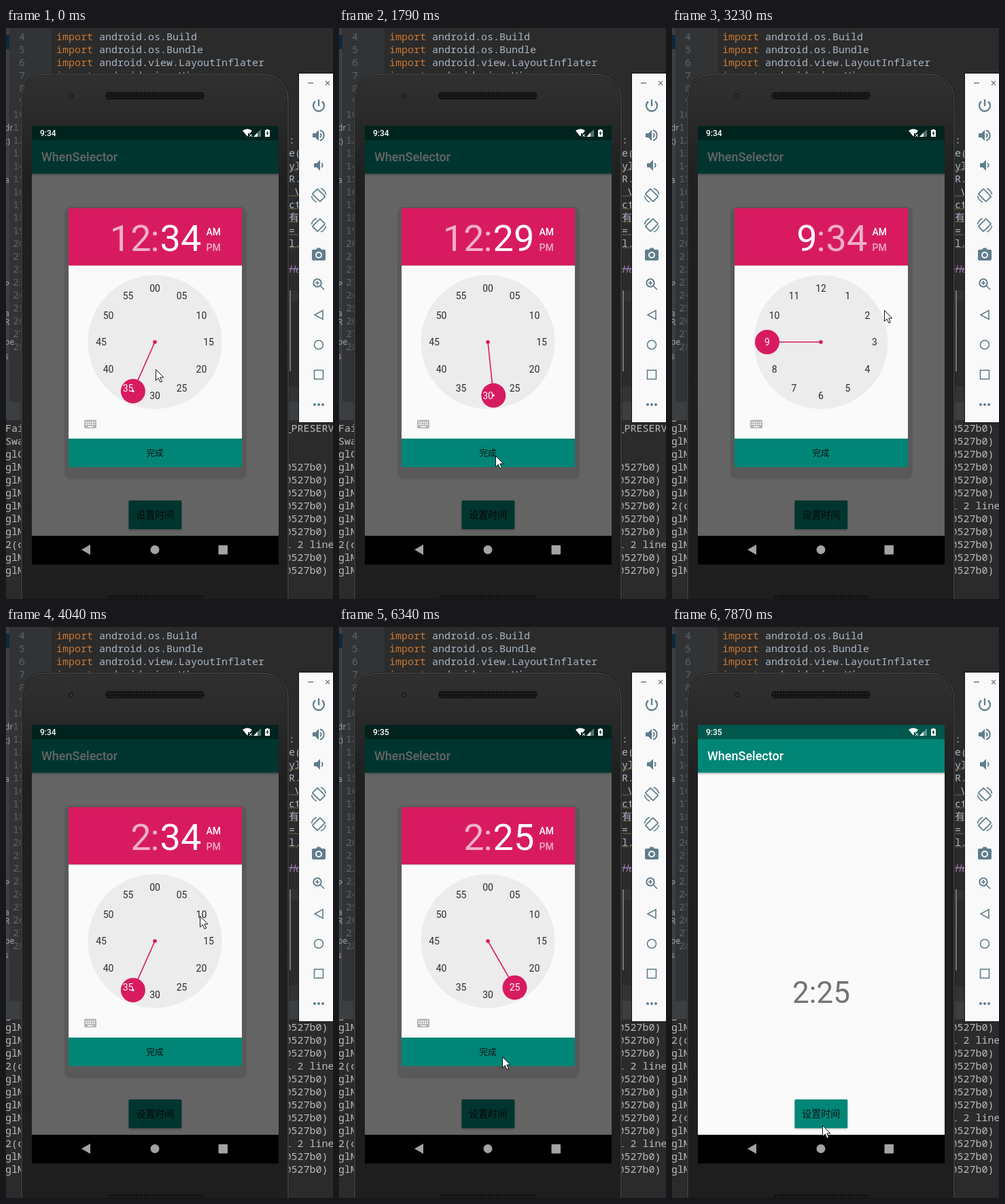
Recreate the animation shown at these times as an HTML page. Size 481 by 840 pixels, loop 7.99 s.

```html
<!DOCTYPE html>
<html lang="en">
<head>
<meta charset="utf-8">
<title>Time picker</title>
<style>
  html, body { margin: 0; width: 100%; height: 100%; overflow: hidden; background: #2b2b2b; }
  svg { display: block; width: 481px; height: 840px; }
  text { white-space: pre; }
  .mono { font: 15px "Noto Sans Mono", "DejaVu Sans Mono", monospace; fill: #a9b7c6; }
  .no { fill: #606366; text-anchor: end; }
  .key { fill: #cc7832; }
  .side { font: 12px "Noto Sans", sans-serif; fill: #a0a4a6; }
  .log { fill: #bbb; }
  .ui { font-family: Roboto, sans-serif; }
  .cjk { font-family: "Noto Sans CJK SC", "Noto Sans CJK", sans-serif; text-anchor: middle; fill: #111; }
  .med { font-weight: 500; fill: #fff; }
  .big { font-size: 54px; fill: #fff; }
  .num { font-size: 14px; text-anchor: middle; }
  .pink { fill: #d81b60; }
  .teal { fill: #008577; }
  .raised { filter: drop-shadow(0 1px 1px rgba(0, 0, 0, .3)); }
  .icon { fill: none; stroke: #5f7d8c; stroke-width: 2; }
  .icon .f { fill: #5f7d8c; stroke: none; }
</style>
</head>
<body>
<svg viewBox="0 0 481 840">
  <defs>
    <linearGradient id="shell" x2="0" y2="1">
      <stop offset="0" stop-color="#303030"/>
      <stop offset=".1" stop-color="#282828"/>
      <stop offset=".2" stop-color="#1f1f1f"/>
      <stop offset="1" stop-color="#1e1e1e"/>
    </linearGradient>
    <linearGradient id="fall" x2="0" y2="1">
      <stop offset="0" stop-opacity=".2"/>
      <stop offset="1" stop-opacity="0"/>
    </linearGradient>
    <pattern id="mesh" width="4" height="4" patternUnits="userSpaceOnUse">
      <rect width="4" height="4" fill="#111"/>
      <circle cx="2" cy="2" r="1" fill="#2c2c2c"/>
    </pattern>
    <clipPath id="logBox"><rect y="577" width="481" height="263"/></clipPath>
    <clipPath id="knobClip"><circle class="knobPos" r="18"/></clipPath>
  </defs>

  <!-- editor -->
  <rect width="481" height="840" fill="#2b2b2b"/>
  <rect width="67" height="550" fill="#313335"/>
  <rect width="5" height="550" fill="#3c3f41"/>
  <rect y="10" width="5" height="21" fill="#0d293e"/>
  <rect x="416" y="386" width="15" height="16" fill="#323232"/>
  <rect x="416" y="527" width="65" height="23" fill="#313335"/>
  <rect y="550" width="481" height="27" fill="#3c3f41"/>
  <g id="side"></g>
  <g id="code"></g>
  <rect x="417" y="386" width="2" height="119" fill="#777"/>
  <g clip-path="url(#logBox)"><g id="log"></g></g>

  <!-- phone -->
  <path d="M23 850V108Q23 68 63 68H375Q415 68 415 108V850" fill="url(#shell)" stroke="#111" stroke-width="2.600"/>
  <path d="M23 850V108Q23 68 63 68H375Q415 68 415 108V850" fill="none" stroke="#666"/>
  <rect x="146" y="94" width="146" height="11" rx="5.500" fill="url(#mesh)"/>
  <rect x="148" y="834" width="143" height="12" rx="5.500" fill="url(#mesh)"/>
  <circle cx="96" cy="100" r="3.500" fill="#1c1d1e"/>
  <circle cx="96" cy="100" r="1.200" fill="#45484a"/>

  <!-- app -->
  <g class="ui">
    <rect x="38" y="144" width="363" height="603" fill="#fafafa"/>
    <rect x="38" y="214.500" width="363" height="4" fill="url(#fall)"/>
    <rect x="38" y="144" width="363" height="21" fill="#00574b"/>
    <rect class="teal" x="38" y="165" width="363" height="49.500"/>
    <text class="med" x="52" y="196" font-size="18">WhenSelector</text>
    <text id="main" x="219.500" y="553" font-size="44" text-anchor="middle" fill="#737373"></text>
    <rect class="teal raised" x="180.500" y="695" width="77.700" height="42.300" rx="1.500"/>
    <text class="cjk" x="219.300" y="721" font-size="14">设置时间</text>
    <rect id="dim" x="38" y="144" width="363" height="603"/>

    <text id="status" class="med" x="50" y="159" font-size="12"></text>
    <g fill="#fff">
      <path d="M348 151Q355 146 362 151L359 155H356V158L355 159.500Z"/>
      <path d="M358 156l4 4m0-4l-4 4" stroke="#fff"/>
      <path d="M364 160L375 149V160Z" opacity=".35"/>
      <path d="M364 160L370 154V160Z"/>
      <path d="M381 150h2v-1h3v1h2v10h-7z"/>
      <path d="M385 151l-2.500 4.500h1.500v3l2.500-4.500h-1.500z" fill="#00352e"/>
    </g>
    <rect x="38" y="747" width="363" height="42.300"/>
    <g fill="#a3a3a3">
      <path d="M111 767.500L124 760V775Z"/>
      <circle cx="219" cy="767.500" r="6.500"/>
      <rect x="312.500" y="761" width="13.500" height="13.500" rx="1"/>
    </g>

    <g id="dialog">
      <rect x="86" y="263" width="268" height="401" rx="9" opacity=".11"/>
      <rect class="pink" x="92" y="265" width="255" height="84.500"/>
      <rect x="92" y="349.500" width="255" height="255" fill="#fafafa"/>
      <rect class="teal" x="92" y="604" width="255" height="42"/>
      <text class="cjk" x="219" y="630" font-size="12.500">完成</text>
      <text id="hour" class="big" x="213.500" y="328" text-anchor="end"></text>
      <text class="big" x="212.500" y="328" opacity=".65">:</text>
      <text id="minute" class="big" x="226.600" y="328"></text>
      <text class="med" x="294.500" y="305" font-size="14">AM</text>
      <text class="med" x="294.500" y="328" font-size="14" opacity=".65">PM</text>
      <circle cx="219" cy="462" r="98.500" fill="#ececec"/>
      <g id="dark" fill="#2b2b2b"></g>
      <circle class="pink" cx="219" cy="462" r="2.800"/>
      <line id="hand" x1="219" y1="462" stroke="#d81b60" stroke-width="1.600"/>
      <circle class="pink knobPos" r="18"/>
      <g clip-path="url(#knobClip)"><g id="light" fill="#fff"></g></g>
      <circle id="dot" class="knobPos" r="1.700" fill="#fff"/>
      <rect x="115" y="576.500" width="18" height="12.500" rx="1.800" fill="#b4b4b4"/>
      <path d="M117 580h14m-14 3h14" stroke="#fafafa" stroke-width="1.800" stroke-dasharray="1.800 1.250"/>
      <path d="M120 586.500h8" stroke="#fafafa" stroke-width="1.600"/>
    </g>
  </g>

  <!-- emulator toolbar -->
  <rect x="430" y="66" width="51" height="515" fill="#111"/>
  <rect x="431" y="67" width="50" height="513" fill="#f9f9f9"/>
  <path d="M444 81h8M470 78l6 6m0-6l-6 6" stroke="#777" stroke-width="1.300"/>
  <g class="icon">
    <g transform="translate(460 114)"><path d="M0-9V1M-5-6A8 8 0 1 0 5-6" stroke-width="2.300"/></g>
    <g transform="translate(460 158)">
      <path class="f" d="M-9-3h4l5-5v16l-5-5h-4z"/>
      <path d="M2-3A3.500 3.500 0 0 1 2 3M2-7.500A7.800 7.800 0 0 1 2 7.500"/>
    </g>
    <g transform="translate(460 202)">
      <path class="f" d="M-7-3h4l5-5v16l-5-5h-4z"/>
      <path d="M4-3A3.500 3.500 0 0 1 4 3"/>
    </g>
    <g id="turn" transform="translate(460 246)">
      <rect x="-5.300" y="-8" width="10.600" height="16" rx="1" transform="rotate(-45)" stroke-width="1.800"/>
      <path d="M3-10Q9.500-7.500 10.500-1M-3 10Q-9.500 7.500-10.500 1" stroke-width="1.600"/>
    </g>
    <use href="#turn" transform="translate(920 44) scale(-1 1)"/>
    <g transform="translate(460 333)">
      <path class="f" d="M-8-7h4l2-2.500h4l2 2.500h4q2 0 2 2v12q0 2-2 2h-16q-2 0-2-2v-12q0-2 2-2z"/>
      <circle r="4" cy="1" stroke="#f9f9f9"/>
    </g>
    <g transform="translate(460 377)">
      <circle cx="-2" cy="-2" r="5.700"/>
      <path d="M2.500 2.500L8 8M-5-2h6M-2-5v6" stroke-width="1.700"/>
    </g>
    <path d="M466 415.500V428.500L454 422Z" stroke-width="1.600"/>
    <circle cx="460" cy="466" r="6.500" stroke-width="1.600"/>
    <rect x="453.500" y="503.500" width="13" height="13" stroke-width="1.600"/>
    <path d="M454 554h12.100" stroke-width="4" stroke-linecap="round" stroke-dasharray="0 6"/>
  </g>

  <path id="cursor" d="M.5.5V16.500L4.200 13L7 19L9.500 18L6.800 12H11.800Z" fill="#fff" stroke="#111"/>
</svg>
<script>
const LOOP = 7990;
const CX = 219, CY = 462, R = 79;
const $ = id => document.getElementById(id);

function put(parent, cls, x, y, str) {
  const el = document.createElementNS("http://www.w3.org/2000/svg", "text");
  el.setAttribute("class", cls);
  el.setAttribute("x", x);
  el.setAttribute("y", y);
  el.textContent = str;
  parent.append(el);
  return el;
}

function set(el, attrs) {
  for (const k in attrs) el.setAttribute(k, attrs[k]);
}

// Editor text: 19 px lines, starting at line 4
const lineY = n => 17.5 + (n - 4) * 19;
for (let n = 4; n <= 28; n++) put($("code"), "mono no", 28, lineY(n), n);
["os.Build", "os.Bundle", "view.LayoutInflater", "view.View"].forEach((name, i) => {
  put($("code"), "mono key", 74, lineY(4 + i), "import");
  put($("code"), "mono", 137, lineY(4 + i), "android." + name);
});
[":", "e(", "yl", "R.", " V", "ct", "有", "=", "l."].forEach((s, i) =>
  put($("code"), "mono", 416, lineY(12 + i), s));
set(put($("code"), "mono", 416, lineY(22), "He"),
  { style: "fill:#9876aa;font-style:italic;text-decoration:line-through" });
const wave = document.createElementNS("http://www.w3.org/2000/svg", "path");
set(wave, {
  d: [210, 248, 267, 286, 305, 324].map(y => `M416 ${y}` + "l2-2l2 2".repeat(4)).join(""),
  fill: "none", stroke: "#85804f", "stroke-width": .8
});
$("code").append(wave);
[["dr", 151], ["t)", 171], ["a", 228], ["P", 382], ["a", 424], ["R", 437], ["pe", 466], ["s", 487]]
  .forEach(([s, y]) => put($("side"), "side", -2, y, s));

// Log lines as [left part, right part]
const make = ["eglM", "0527b0)"], same = ["82(c", "l 2 lines"];
const log = [[" Fai", "_PRESERVED"], [" Swa", ""], ["eglC", ""],
  ...Array(6).fill(make), same, ...Array(5).fill(make), same, ...Array(6).fill(make)];
const logRows = log.map(([a, b], i) => [
  put($("log"), "mono log", -10, 594 + i * 19, a),
  put($("log"), "mono log", 410.5, 594 + i * 19, b)
]);

// Dial labels, once dark and once white for inside the knob
const labels = ["dark", "light"].map(id => Array.from({ length: 12 }, (_, i) => {
  const a = i * Math.PI / 6;
  return put($(id), "num", CX + R * Math.sin(a), CY + 5 - R * Math.cos(a), "");
}));

// Pointer stops: time, x, y
const stops = [
  [0, 220, 502], [120, 206, 515], [270, 190, 531], [420, 181, 538], [570, 188, 544],
  [720, 200, 549], [870, 214, 552], [1030, 228, 549], [1180, 232, 562], [1330, 240, 582],
  [1480, 236, 602], [1640, 232, 622], [1790, 230, 629], [2210, 226, 675], [2330, 222, 712],
  [2450, 228, 690], [2570, 250, 612], [2690, 274, 533], [2840, 292, 480], [2990, 303, 445],
  [3110, 309, 425], [3230, 312, 415], [3380, 300, 419], [3530, 285, 425], [4560, 283, 450],
  [4690, 279, 490], [4820, 275, 522], [4950, 272, 535], [5480, 267, 565], [5630, 257, 610],
  [5780, 246, 655], [5910, 238, 679], [6060, 240, 632], [7450, 238, 655], [7590, 231, 692],
  [7730, 224, 722], [7870, 221, 733]
];

// Each event overrides part of the state from its time on
const events = [
  [0, { h: 12, m: 34, hours: false, dim: .6, alpha: 1, off: 0, main: "0:29", clock: "9:34" }],
  [420, { m: 35 }], [570, { m: 34 }], [720, { m: 32 }], [870, { m: 30 }], [1030, { m: 29 }],
  [1940, { dim: .32, alpha: .08 }],
  [2090, { dim: 0, alpha: 0, off: 2 }],
  [2840, { h: 9, m: 34, hours: true, dim: .3, alpha: .4, off: 3 }],
  [2990, { dim: .6, alpha: 1 }],
  [3680, { h: 2 }],
  [3800, { hours: false }],
  [3920, { off: 6 }],
  [4560, { clock: "9:35" }],
  [5230, { m: 25 }],
  [6890, { dim: .32, alpha: .08, main: "2:25" }],
  [7010, { dim: 0, alpha: 0, off: 8 }]
];

function stateAt(t) {
  return Object.assign({}, ...events.filter(e => e[0] <= t).map(e => e[1]));
}

function draw(t) {
  const s = stateAt(t);
  const [, x, y] = stops.filter(p => p[0] <= t).pop();
  set($("cursor"), { transform: `translate(${x} ${y})` });

  set($("dim"), { opacity: s.dim });
  set($("dialog"), { opacity: s.alpha });
  $("main").textContent = s.main;
  $("status").textContent = s.clock;
  $("hour").textContent = s.h;
  $("minute").textContent = String(s.m).padStart(2, "0");
  set($("hour"), { opacity: s.hours ? 1 : .65 });
  set($("minute"), { opacity: s.hours ? .65 : 1 });

  for (const ring of labels) ring.forEach((el, i) => {
    el.textContent = s.hours ? i || 12 : String(i * 5).padStart(2, "0");
  });
  const a = (s.hours ? s.h / 12 : s.m / 60) * 2 * Math.PI;
  const kx = CX + R * Math.sin(a), ky = CY - R * Math.cos(a);
  set($("hand"), { x2: kx, y2: ky });
  document.querySelectorAll(".knobPos").forEach(el => set(el, { cx: kx, cy: ky }));
  set($("dot"), { opacity: !s.hours && s.m % 5 ? 1 : 0 });

  set($("log"), { transform: `translate(0 ${-19 * s.off})` });
  logRows.forEach((row, i) => row.forEach(el => set(el, { opacity: i < s.off + 12 ? 1 : 0 })));
}

const start = performance.now();
function tick() {
  draw((performance.now() - start) % LOOP);
  requestAnimationFrame(tick);
}
tick();
</script>
</body>
</html>
```
